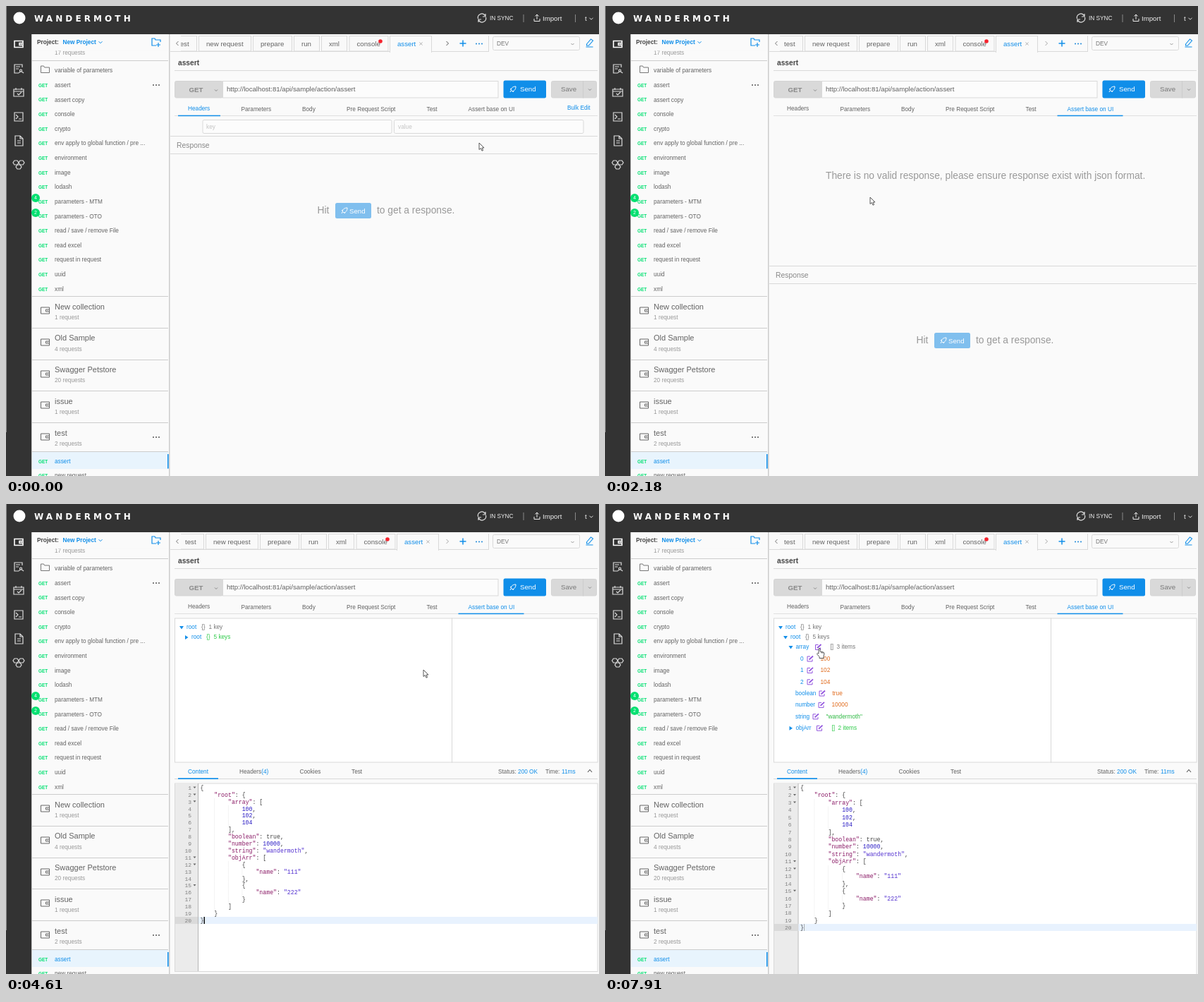
An HTML page for the animation above (7.99 s loop, 841x666 px).

```html
<!DOCTYPE html>
<html lang="en">
<head>
<meta charset="utf-8">
<title>API client: assertions</title>
<style>
html, body { margin: 0; width: 100%; height: 100%; overflow: hidden; background: #fafafa; }
svg { display: block; width: 841px; height: 666px; font-family: "Liberation Sans", Arial, sans-serif; }
text { white-space: pre; }
.mono { font-family: "Liberation Mono", monospace; }
.b { font-weight: bold; }
</style>
</head>
<body>
<svg id="stage" viewBox="0 0 841 666"></svg>
<script>
const LOOP = 7990;
const BLUE = '#108ee9', GREEN = '#00e070', EDGE = '#d9d9d9', INK = '#636363', PALE = '#999';
const SMALL = 8.28, MID = 9.66, LARGE = 11, HUGE = 13.8, CODE = 8.22;

// Moments of the user's actions, in ms
const OPEN_TAB = 1450, SEND = 3880, RESPONSE = 3990, REFLOW = 4790, OPEN_ROOT = 5850, OPEN_ARRAY = 6460;

const text = (x, mid, s, size = SMALL, fill = INK, attrs = '') =>
  `<text x="${x}" y="${(mid + size * .35).toFixed(2)}" font-size="${size}" fill="${fill}" ${attrs}>${s}</text>`;
const rect = (x, y, w, h, fill, attrs = '') =>
  `<rect x="${x}" y="${y}" width="${w}" height="${h}" fill="${fill}" ${attrs}/>`;
const frame = (x, y, w, h, fill = '#fff', stroke = EDGE, attrs = '') =>
  rect(x + .5, y + .5, w - 1, h - 1, fill, `stroke="${stroke}" ${attrs}`);
const hline = (x1, x2, y, color = EDGE) => rect(x1, y, x2 - x1, 1, color);
const path = (d, stroke, width = 1, x = 0, y = 0, fill = 'none') =>
  `<path transform="translate(${x} ${y})" d="${d}" fill="${fill}" stroke="${stroke}" stroke-width="${width}"/>`;
const group = (id, body, attrs = '') => `<g id="${id}" ${attrs}>${body}</g>`;
const chevron = (x, y, color, r = 2) => path(`M${-r} ${-r / 2}L0 ${r / 2}L${r} ${-r / 2}`, color, 1, x, y);
const dots = (x, y, color) => [-4, 0, 4].map(d => `<circle cx="${x + d}" cy="${y}" r="1" fill="${color}"/>`).join('');
const wallet = (x, y, color, w = 1) =>
  path('M-6 -4.500H6V4.500H-6ZM6 -1.500H1V1.500H6M3 0H4', color, w, x, y);
const rocket = (x, y, color) =>
  path('M-3 1C-2 -3 1 -4 4 -4C4 -1 3 2 -1 3ZM-2 -1L-4 0M1 2L0 4M-3 2L-4 4', color, 1, x, y);
const edit = (x, y, color = '#9254de') =>
  path('M0 -3H-4V4H3V1', color, 1, x, y) + path('M-1.500 1.500L4 -3.500', color, 1.8, x, y);

function topBar() {
  return rect(0, 0, 841, 40, '#333') + rect(0, 40, 36.5, 626, '#333') + rect(0, 0, 1, 604, '#8a8a8a') +
    '<circle cx="19" cy="17" r="8.5" fill="#fff"/>' +
    text(40, 18, 'WANDERMOTH', 12, '#fff', 'class="b" letter-spacing="4.1" style="font-family:\'DejaVu Sans\',sans-serif"') +
    path('M-5.500 1A5.500 5.500 0 0 1 4 -4L5 -2M5 -6V-2H1M5.500 -1A5.500 5.500 0 0 1 -4 4L-5 2M-5 6V2H-1', '#ddd', 1.2, 675, 17) +
    text(686, 17.5, 'IN SYNC', SMALL, '#eee') + rect(733.5, 12, 1, 11, '#888') +
    path('M-4 1V4.500H4V1M0 2V-5M-2.500 -2.500L0 -5L2.500 -2.500', '#eee', 1, 753, 17) +
    text(761, 17.5, 'Import', MID, '#eee') + rect(807, 12, 1, 11, '#888') +
    text(821, 17.5, 't', MID, '#eee') + chevron(830, 18, '#ddd', 2.5);
}

function rail() {
  const c = '#ddd';
  return wallet(18, 54, '#fff', 1.6) +
    path('M5 -2V-6H-6V6H0M-4 -3H2M-4 0H0M3 1A1.500 1.500 0 1 0 3.100 1M0 6Q3 2 7 6', c, 1.2, 18, 89) +
    path('M-7 -4H7V6H-7ZM-7 -1H7M-4 -6V-3M4 -6V-3M-2 2L0 4L4 0', c, 1.2, 18, 122) +
    path('M-6 -6H6V6H-6ZM-4 -3L-1 0L-4 3M0 3H4', c, 1.2, 18, 157) +
    path('M-5 -7H2L6 -3V7H-5ZM2 -7V-3H6M-2 0H3M-2 3H3', c, 1.2, 18, 191) +
    [[-4, -3], [4, -3], [0, 3]].map(([x, y]) =>
      path('M-2 -3H2L4 0L2 3H-2L-4 0Z', c, 1.2, 18 + x, 225 + y)).join('');
}

function sidebar() {
  const requests = ['assert', 'assert copy', 'console', 'crypto', 'env apply to global function / pre ...',
    'environment', 'image', 'lodash', 'parameters - MTM', 'parameters - OTO', 'read / save / remove File',
    'read excel', 'request in request', 'uuid', 'xml'];
  const collections = [['New collection', '1 request'], ['Old Sample', '4 requests'],
    ['Swagger Petstore', '20 requests'], ['issue', '1 request'], ['test', '2 requests']];
  const request = (name, y, color) =>
    text(46, y + .5, 'GET', 6.4, GREEN, 'class="b"') + text(69, y, name, SMALL, color);
  const badge = (y, n) => `<circle cx="42" cy="${y}" r="6" fill="${GREEN}"/>` +
    text(42, y, n, 7, '#fff', 'text-anchor="middle"');
  return rect(36.5, 40, 195, 626, '#fafafa') +
    text(44, 51.5, 'Project:', SMALL, '#444', 'class="b"') +
    text(80.5, 51.5, 'New Project', SMALL, BLUE, 'class="b"') + chevron(134, 51.5, BLUE, 2.5) +
    path('M0 5H-6V-5H-2L-1 -3H6V0M3 1V7M0 4H6', BLUE, 1.2, 213, 51) +
    text(69, 66, '17 requests', SMALL, PALE) + rect(37, 61, 193, 2.5, '#fafafa') + hline(37, 230, 77, '#ccc') +
    path('M-6 4.500V-5H-2L-1 -3H6V4.500Z', '#777', 1, 55.5, 90) + text(69, 91, 'variable of parameters') +
    requests.map((name, i) => request(name, 112 + 20.63 * i)).join('') + dots(213, 112, '#555') +
    badge(272, 4) + badge(293, 2) +
    collections.map(([name, note], i) => {
      const y = 411 + 44.75 * i;
      return hline(37, 230, Math.round(y), '#ccc') + wallet(55.5, Math.round(y + 20) + .5, '#666') +
        text(69, y + 14.8, name, LARGE, INK) + text(69, y + 30, note, SMALL, PALE);
    }).join('') + dots(213, 611, '#555') +
    hline(37, 230, 631, '#ccc') + rect(37, 632, 193, 24, '#e8f4fd') + rect(229, 635, 1.6, 20.5, BLUE) +
    request('assert', 645, BLUE) + request('new request', 665.5) + rect(231, 40, 1.5, 626, '#ccc');
}

function tabs() {
  const items = [['test', 240, 41], ['new request', 283, 75], ['prepare', 360, 56], ['run', 418, 37],
    ['xml', 457, 37], ['console', 496.5, 56]];
  const bar = items.map(([name, x, w]) => {
    return frame(x, 42, w, 22.5, '#f9f9f9') + text(x + (x < 250 ? 14 : 11), 54, name, MID, INK);
  }).join('') + '<circle cx="541" cy="50" r="2.8" fill="#f5222d"/>' +
    hline(233, 554, 64) + hline(614, 694, 64) + frame(554, 42, 60, 24, '#fafafa') + rect(555, 63, 58, 4, '#fafafa') +
    text(565, 54, 'assert', MID, BLUE) + path('M-2 -2L2 2M2 -2L-2 2', '#999', .8, 598.5, 53.5);
  return '<clipPath id="tabClip"><rect x="248" y="40" width="367" height="28"/></clipPath>' +
    `<g clip-path="url(#tabClip)">${group('tabBar', bar)}</g>` + hline(233, 248, 64) + hline(615, 685, 64) +
    rect(684, 42, 1, 22, EDGE) + path('M1.500 -3L-1.500 0L1.500 3', '#777', 1, 243, 53) +
    group('nextTabs', path('M-1.500 -3L1.500 0L-1.500 3', '#555', 1, 626, 53)) +
    path('M-4.500 0H4.500M0 -4.500V4.500', BLUE, 1.5, 648, 53) + dots(671, 53.5, '#1a86d8') +
    frame(690, 43, 124, 20, '#fafafa', EDGE, 'rx="2"') + text(696, 53.5, 'DEV', SMALL, '#777') + chevron(803.5, 54, '#999') +
    path('M-4 2L2 -5L5 -3L-1 4L-4 4ZM-5 6H5', BLUE, 1.1, 827.5, 52);
}

function requestBar() {
  return text(244, 80, 'assert', 10.2, '#444', 'class="b"') + hline(239, 839, 91) +
    frame(239, 106, 69, 24.5, EDGE, '#d4d4d4', 'rx="2"') + text(259.5, 118.5, 'GET', MID, '#888', 'class="b"') +
    chevron(298, 119.5, '#888') + frame(307, 106, 391.5, 24.5, '#fcfcfc') +
    text(313, 118, 'http://localhost:81/api/sample/action/assert', MID, '#606060') +
    rect(705.5, 105.5, 60.5, 25, BLUE, 'id="wave" rx="3" stroke="#108ee9"') +
    rect(705.5, 105.5, 60.5, 25, BLUE, 'id="send" rx="2.5"') + rocket(719, 118, '#fff') + text(729, 118, 'Send', MID, '#fff') +
    frame(773, 106, 65, 24.5, EDGE, '#d4d4d4', 'rx="2"') + rect(818, 106, 1, 24.5, '#cdcdcd') +
    text(787, 118, 'Save', MID, '#777') + chevron(828, 118.5, '#888') +
    hline(239, 839, 155, '#e0e0e0') + text(258, 145, 'Headers', SMALL, BLUE, 'id="headersLabel"') +
    [[333.5, 'Parameters'], [420, 'Body'], [483, 'Pre Request Script'], [596.5, 'Test']]
      .map(([x, s]) => text(x, 146, s)).join('') +
    text(655.5, 146, 'Assert base on UI', SMALL, INK, 'id="assertLabel"') +
    rect(0, 154.7, 1, 1.5, BLUE, 'id="underline"');
}

function headersPane() {
  return text(796, 144.5, 'Bulk Edit', SMALL, BLUE) + frame(278.5, 161, 269, 20, '#fcfcfc', EDGE, 'rx="2"') +
    frame(550, 161, 269.5, 20, '#fcfcfc', EDGE, 'rx="2" id="valueBox"') +
    text(284, 171, 'key', SMALL, '#c4c4c4') + text(556, 171, 'value', SMALL, '#c4c4c4');
}

function emptyResponse() {
  return hline(233, 839, 184) + text(242, 197, 'Response', 10.35, '#888') + hline(233, 839, 209) +
    text(441.5, 289.5, 'Hit', HUGE, PALE) + rect(467, 279, 51, 22, '#80bfee', 'rx="2.5"') +
    rocket(480, 290, '#fff') + text(487, 290.5, 'Send', MID, '#fff') + text(526, 289.5, 'to get a response.', HUGE, PALE);
}

function responsePane() {
  return frame(239, 161.5, 394, 205) + frame(632, 161.5, 207.5, 205) +
    hline(239, 839, 389) + rect(244, 388.3, 57, 1.7, BLUE) + text(258, 379.5, 'Content', SMALL, BLUE) +
    text(331, 379.5, `Headers<tspan fill="${BLUE}">(4)</tspan>`) + text(416.5, 379.5, 'Cookies') + text(490, 379.5, 'Test') +
    text(698, 379, `Status: <tspan fill="${BLUE}">200 OK</tspan>`) +
    text(765, 379, `Time:  <tspan fill="${BLUE}" x="788">11ms</tspan>`) + path('M-3 2L0 -1.500L3 2', '#555', 1.1, 828, 378);
}

const sample = { root: { array: [100, 102, 104], boolean: true, number: 10000, string: 'wandermoth',
  objArr: [{ name: '111' }, { name: '222' }] } };
const codeLines = JSON.stringify(sample, null, 4).split('\n');
const colored = line => line
  .replace(/("\w+")(:?)|\b(\d+)\b/g, (m, str, colon, num) => {
    const fill = num ? '#2a1cc4' : colon ? '#8a1a66' : '#5230d0';
    return `<tspan fill="${fill}">${str || num}</tspan>${colon || ''}`;
  });

function editor(pitch, x, bottom, caret) {
  const gutter = x - 3.5;
  const lastTop = Math.round(402 + pitch * 18.5), rowHeight = Math.round(pitch);
  const rows = codeLines.map((line, i) => {
    const y = 402 + pitch * i, fold = /[{[]$/.test(line);
    return text(x - 12.5, y, i + 1, 8, '#808080', 'text-anchor="end" class="mono"') +
      (fold ? path('M-2 -1H2L0 1.500Z', 'none', 0, x - 8, y - .5, '#666') : '') +
      text(x, y, colored(line), CODE, '#444', 'class="mono"');
  }).join('');
  const guides = codeLines.map((line, i) => {
    const depth = line.search(/\S/) / 4;
    return Array.from({ length: Math.max(0, depth - 1) }, (_, k) =>
      rect(x + CODE * 2.4 * (k + 1), 397 + pitch * i, .5, pitch, '#e8e8e8')).join('');
  }).join('');
  return frame(239, 395.5, 600.5, bottom - 395.5) + rect(240, 396, gutter - 240, bottom - 397, '#ebebeb') +
    rect(gutter, 396, 1, bottom - 397, '#b5b5b5') + rect(240, lastTop, gutter - 240, rowHeight, '#dadada') +
    rect(gutter + 1, lastTop, 838 - gutter, rowHeight, '#e8f2fe') + guides + rows +
    rect(x + 5, lastTop, caret, rowHeight, caret > 1 ? '#111' : '#999');
}

function node(x, y, key, kind, note, open) {
  const tri = open ? 'M-3 -2H3L0 2.500Z' : 'M-2 -3L2.500 0L-2 3Z';
  const color = open ? '#777' : '#2fcb4a';
  const gap = key === 'root' ? 21 : key === 'array' ? 49 : 51;
  const noteX = x + gap + (kind === '{}' ? 10.5 : 9);
  return path(tri, 'none', 0, x - 7, y + .5, BLUE) + text(x, y, key, SMALL, BLUE) +
    (key === 'root' ? '' : edit(x + gap - 17, y)) + text(x + gap, y, kind, SMALL, color) + text(noteX, y, note, SMALL, color);
}
const leaf = (x, y, key, iconX, value, color = '#e0691a') =>
  text(x, y, key, SMALL, BLUE) + edit(iconX, y) + text(iconX + 14.5, y, value, SMALL, color);
const fields = y => leaf(270, y, 'boolean', 308, 'true') + leaf(270, y + 16.4, 'number', 307, '10000') +
  leaf(270, y + 32.8, 'string', 299, '"wandermoth"', '#2fb944') + node(270.5, y + 49.2, 'objArr', '[]', '2 items', false);

function tree() {
  return node(256, 174.5, 'root', '{}', '1 key', true) +
    group('rootClosed', node(263, 188.5, 'root', '{}', '5 keys', false)) +
    group('rootOpen', node(263, 188.5, 'root', '{}', '5 keys', true)) +
    group('arrayClosed', node(270.5, 202.5, 'array', '[]', '3 items', false) + fields(219)) +
    group('arrayOpen', node(270.5, 202.5, 'array', '[]', '3 items', true) +
      sample.root.array.map((v, i) => leaf(277, 219 + 16.4 * i, i, 291, v)).join('') + fields(268));
}

function cursor() {
  return group('cursor',
    group('arrow', path('M0 0V9.500L2.300 7.500L4 11.200L5.600 10.500L4 7H7Z', '#444', .9, 0, 0, '#fff')) +
    group('hand', path('M-1 8V1Q0 -.5 1 1V5L5.500 6Q7 6.500 7 8L6 12V14.500H0V12.500L-3.500 8.500Q-3 6.500 -1 8ZM3 5.500V7.500M5 6V7.700', '#444', .9, 0, 0, '#fff')));
}

document.getElementById('stage').innerHTML = rect(0, 0, 841, 666, '#fafafa') + tabs() + requestBar() +
  group('headersPane', headersPane()) +
  group('noResponse', text(313, 240.5, 'There is no valid response, please ensure response exist with json format.', HUGE, PALE)) +
  group('emptyResponse', emptyResponse()) + group('responsePane', responsePane()) +
  group('editorTight', editor(9.9, 275.5, 663, 1.5)) + group('editorLoose', editor(10.45, 277, 667, .8)) +
  group('tree', tree()) + topBar() + rail() + sidebar() + cursor();

// Motion: every rule shares one loop and is keyed in ms
const css = [];
function animate(id, keys, timing = 'linear') {
  const steps = keys.map(([ms, rule]) => `${(ms / LOOP * 100).toFixed(4)}%{${rule}}`);
  steps.push(`100%{${keys[keys.length - 1][1]}}`);
  css.push(`@keyframes ${id}{${steps.join('')}} #${id}{animation:${id} ${LOOP}ms ${timing} infinite}`);
}
function show(id, ...spans) {
  const keys = spans[0][0] > 0 ? [[0, 'opacity:0']] : [];
  spans.forEach(([from, to]) => {
    keys.push([from, 'opacity:1']);
    if (to < LOOP) keys.push([to, 'opacity:0']);
  });
  animate(id, keys, 'step-end');
}
const fade = (id, prop, stops) => animate(id, stops.map(([ms, v]) => [ms, `${prop}:${v}`]));

show('headersPane', [0, OPEN_TAB]);
show('noResponse', [OPEN_TAB, RESPONSE]);
show('responsePane', [RESPONSE, LOOP]);
show('tree', [RESPONSE, LOOP]);
show('editorTight', [RESPONSE, REFLOW]);
show('editorLoose', [REFLOW, LOOP]);
show('rootClosed', [0, OPEN_ROOT]);
show('rootOpen', [OPEN_ROOT, LOOP]);
show('arrayClosed', [OPEN_ROOT, OPEN_ARRAY]);
show('arrayOpen', [OPEN_ARRAY, LOOP]);

animate('emptyResponse', [[0, 'transform:none;opacity:1'], [OPEN_TAB, 'transform:translateY(184px);opacity:1'],
  [RESPONSE, 'transform:translateY(184px);opacity:0']], 'step-end');
animate('tabBar', [[0, 'transform:translateX(-10px)'], [OPEN_TAB, 'transform:none']], 'step-end');
animate('nextTabs', [[0, 'opacity:1'], [OPEN_TAB, 'opacity:.5']], 'step-end');
animate('underline', [[0, 'transform:translateX(244px) scaleX(60)'],
  [OPEN_TAB, 'transform:translateX(244px) scaleX(60);animation-timing-function:ease-in-out'],
  [OPEN_TAB + 300, 'transform:translateX(641.5px) scaleX(93)']]);

fade('headersLabel', 'fill', [[0, BLUE], [OPEN_TAB, BLUE], [OPEN_TAB + 300, INK]]);
fade('assertLabel', 'fill', [[0, INK], [680, INK], [920, '#3ba3ee'], [OPEN_TAB, '#3ba3ee'], [OPEN_TAB + 200, BLUE]]);
fade('valueBox', 'stroke', [[0, EDGE], [280, EDGE], [400, '#49a9ee'], [560, '#49a9ee'], [800, EDGE]]);
fade('send', 'fill', [[0, BLUE], [3570, BLUE], [3750, '#49a9ee'], [4020, '#49a9ee'], [4250, BLUE]]);
animate('wave', [[0, 'stroke-width:0;opacity:0'], [SEND, 'stroke-width:0;opacity:.4'], [SEND + 400, 'stroke-width:6;opacity:0']]);

const route = [[0, 671, 194], [90, 671, 194], [450, 674, 172], [800, 681, 142], [1480, 681, 142], [1750, 560, 200],
  [2060, 376, 271], [2200, 376, 271], [2450, 346, 264], [2900, 487, 235], [3300, 640, 178], [3530, 709, 135],
  [3700, 726, 115], [3960, 726, 115], [4250, 660, 180], [4520, 592, 235], [4620, 592, 235], [4900, 400, 218],
  [5140, 255, 190], [5860, 255, 190], [6090, 266, 209], [6200, 266, 208], [6380, 263, 203], [6560, 263, 203],
  [7080, 269, 235], [7200, 269, 235], [7550, 290, 220], [7860, 304, 204]];
animate('cursor', route.map(([ms, x, y]) => [ms, `transform:translate(${x}px,${y}px)`]));
show('hand', [680, 1560], [3480, 4040], [5100, 5960], [6190, 6620], [7720, LOOP]);
show('arrow', [0, 680], [1560, 3480], [4040, 5100], [5960, 6190], [6620, 7720]);

const sheet = document.createElement('style');
sheet.textContent = css.join('\n');
document.head.append(sheet);
</script>
</body>
</html>
```
